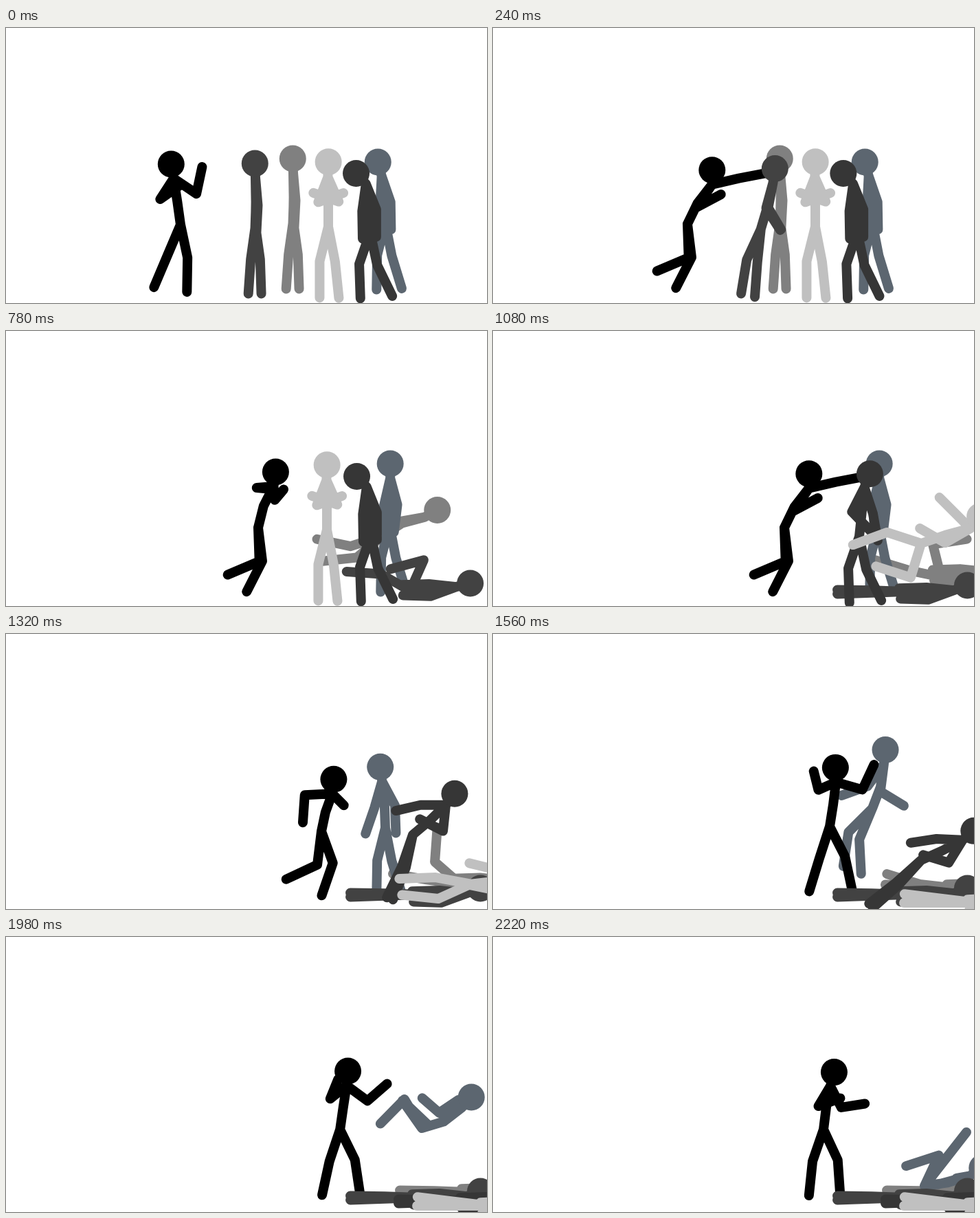
An HTML page with a canvas for the animation above (2280 ms loop, 700 by 400 pixels).

```html
<!DOCTYPE html>
<html lang="en">
<head>
<meta charset="utf-8">
<title>Stick figure fight</title>
<style>
  html, body { margin: 0; width: 100%; height: 100%; overflow: hidden; background: #fff; }
  canvas { display: block; }
</style>
</head>
<body>
<canvas id="stage" width="700" height="400"></canvas>
<script>
const LOOP = 2280, STEP = 60, LIMB = 14, HEAD = 19.5;
const BONE = { spine: 34, neck: 21, thigh: 49, shin: 50, arm: 40 };
const ctx = document.getElementById('stage').getContext('2d');

// Joints: hip chest neck head | knee foot | knee foot | elbow hand | elbow hand
const PARENT = [-1, 0, 1, 2, 0, 4, 0, 6, 2, 8, 2, 10];
const LINES = [[0, 1, 2, 3], [0, 4, 5], [0, 6, 7], [2, 8, 9], [2, 10, 11]];

// Angles in degrees, 0 is right and 90 is down. Torso and arms may end with a
// scale for foreshortening.
function pose(torso, legs, ...arms) {
  const [back, chest, head, stretch = 1] = torso;
  const { spine, neck, thigh, shin, arm } = BONE;
  const bones = [
    [spine * stretch, back], [spine * stretch, chest], [neck, head],
    [thigh, legs[0]], [shin, legs[1]], [thigh, legs[2]], [shin, legs[3]]
  ];
  for (const [upper, fore, reach = 1] of arms) bones.push([arm * reach, upper], [arm * reach, fore]);
  return bones.map(([len, deg]) => [len, deg * Math.PI / 180]);
}

// Shared parts
const lunge = [88, 157, 83, 117];
const upright = [98, 94, 82, 88];
const braced = [109, 88, 78, 64];
const strolling = [104, 91, 79, 73];
const hanging = [[89, 92], [85, 93]];
const trailing = [[186, 178], [160, 182]];

// Fighter
const guard = pose([-98, -99, -100], [113, 113, 78, 91], [123, -35, .9], [34, -78]);
const cover = pose([-81, -76, -87], lunge, [182, 8, .72], [50, -105, .88]);
const tuck = pose([-76, -63, -82, .95], lunge, [175, 5, .62], [85, -50, .5]);
const punch = pose([-64, -52, -90], lunge, [124, -28], [-13, -11]);
const windup = pose([-78, -70, -84, .84], [97, 155, 70, 109], [177, 94], [45, 225, .6]);
const uppercut = pose([-81, -83, -92, .96], [108, 107, 63, 78], [156, -104, .7], [16, -65]);
const ready = pose([-83, -79, -75, .94], [109, 96, 65, 86], [121, -20, .85], [63, -9, .87]);

// Opponents on their feet
const idle = pose([-89, -91, -92, 1.03], upright, ...hanging);
const crossed = pose([-90, -91, -88], [104, 90, 79, 84], [111, -20, .92], [66, 199, .92]);
const hunched = pose([-90, -100, -133, 1.04], braced, [98, 89], [68, 90]);
const staggered = pose([-84, -84, -68, 1.06], braced, [117, 46], [72, 80]);
const glance = pose([-92, -97, -105], strolling, [93, 90], [71, 89]);
const alert = pose([-90, -88, -90], strolling, [103, 87], [75, 97]);
const open = pose([-92, -96, -97], strolling, [106, 109], [62, 88]);

// Opponents in the air and on the ground
const tossed = pose([-12, -21, -43], [182, 121, 152, 119], [170, -82, .75], [165, -75, .6]);
const skid = pose([-12, 2, -14], [-66, 165, 210, 184], ...trailing);
const flung = pose([-33, -15, -29], [162, 192, 140, 174], [165, 168], [170, 168]);
const kneeUp = pose([-5, -8, -12], [192, 197, -104, -9], ...trailing);
const sprawl = pose([-19, -15, -51, 1.04], [198, 160, 107, 198], [225, 225, .75], [150, 210]);
const doubled = pose([-40, -44, -52, .95], [109, 116, 102, 112], [180, 167, .92], [96, 207, .95]);
const launched = pose([-23, -53, -58, .95], [197, 114, 180, 115], [168, -97], [168, -82]);
const bounced = pose([-8, -17, -33], [-65, 162, -52, -52], [165, 165, .6], [170, 30, .5]);
const flat = pose([0, -3, -20, 1.04], [182, 181, 178, 178], ...trailing);
const tilted = pose([0, -3, -20], [187, 187, 180, 180], ...trailing);

// Back to front; each key is a time, the hip position and a pose.
const figures = [
  { color: '#808080', keys: [[0, 418, 281, idle], [600, 418, 281, idle], [780, 548, 298, flung],
    [1080, 652, 358, kneeUp], [1620, 672, 371, flat]] },
  { color: '#5c6670', keys: [[0, 552, 283, glance], [540, 552, 283, glance], [780, 558, 282, alert],
    [1080, 561, 282, alert], [1320, 552, 282, open], [1500, 552, 282, open],
    [1680, 552, 197, launched], [1800, 588, 215, launched], [2220, 628, 362, bounced]] },
  { color: '#000', keys: [[0, 254, 286, guard], [240, 283, 285, punch], [480, 318, 285, cover],
    [630, 340, 285, punch], [780, 367, 286, tuck], [930, 398, 286, punch], [1080, 424, 286, punch],
    [1320, 459, 287, windup], [1500, 490, 280, uppercut], [1800, 490, 280, uppercut], [2220, 481, 280, ready]] },
  { color: '#424242', keys: [[0, 363, 288, idle], [180, 363, 288, idle], [480, 497, 311, tossed],
    [780, 588, 378, skid], [1080, 600, 379, flat]] },
  { color: '#363636', keys: [[0, 530, 297, hunched], [780, 531, 297, hunched], [1080, 533, 299, staggered],
    [1320, 592, 292, doubled], [1920, 670, 384, flat]] },
  { color: '#c0c0c0', size: 1.06, keys: [[0, 469, 289, crossed], [600, 469, 289, crossed], [780, 467, 289, crossed],
    [900, 467, 289, crossed], [1080, 623, 309, sprawl], [1440, 703, 391, tilted]] }
];

const mix = (a, b, k) => a + (b - a) * k;

function mixAngle(a, b, k) {
  const d = b - a;
  return a + Math.atan2(Math.sin(d), Math.cos(d)) * k;
}

// Joint positions of a figure at time t
function joints({ keys, size = 1 }, t) {
  const last = keys.length - 1;
  const next = keys.findIndex(key => key[0] > t);
  const [t0, x0, y0, a] = keys[next < 0 ? last : next - 1];
  const [t1, x1, y1, b] = keys[next < 0 ? last : next];
  const k = t1 > t0 ? (t - t0) / (t1 - t0) : 0;
  const out = [[mix(x0, x1, k), mix(y0, y1, k)]];
  a.forEach(([len, angle], i) => {
    const [x, y] = out[PARENT[i + 1]];
    const r = mix(len, b[i][0], k) * size;
    const turn = mixAngle(angle, b[i][1], k);
    out.push([x + r * Math.cos(turn), y + r * Math.sin(turn)]);
  });
  return out;
}

function drawFigure(figure, t) {
  const j = joints(figure, t);
  ctx.strokeStyle = ctx.fillStyle = figure.color;
  ctx.beginPath();
  for (const line of LINES) {
    line.forEach((n, i) => i ? ctx.lineTo(...j[n]) : ctx.moveTo(...j[n]));
  }
  ctx.stroke();
  ctx.beginPath();
  ctx.arc(...j[3], HEAD, 0, Math.PI * 2);
  ctx.fill();
}

function draw(t) {
  ctx.fillStyle = '#fff';
  ctx.fillRect(0, 0, 700, 400);
  ctx.lineWidth = LIMB;
  ctx.lineCap = ctx.lineJoin = 'round';
  for (const figure of figures) drawFigure(figure, t);
}

const start = performance.now();
function tick() {
  const t = (performance.now() - start) % LOOP;
  draw(Math.floor(t / STEP) * STEP);
  requestAnimationFrame(tick);
}
tick();
</script>
</body>
</html>
```
